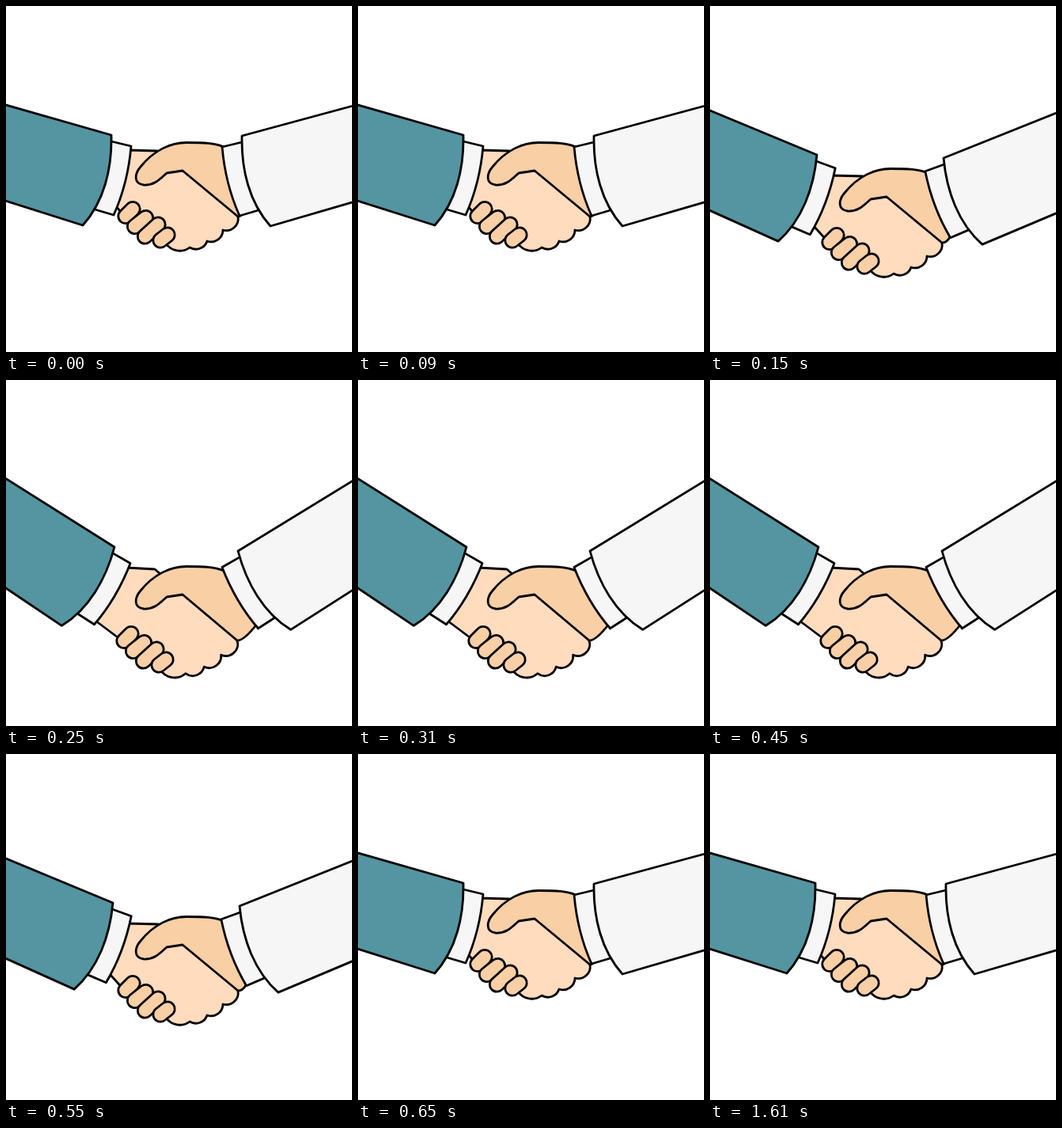
Animation of 437 by 437 pixels, one loop 2250 ms. Source, as an HTML page with a canvas:

```html
<!DOCTYPE html>
<html lang="en">
<head>
<meta charset="utf-8">
<title>Handshake</title>
<style>
html, body { margin: 0; height: 100%; overflow: hidden; background: #fff; }
canvas { display: block; }
</style>
</head>
<body>
<canvas id="stage" width="437" height="437"></canvas>
<script>
const ctx = document.getElementById('stage').getContext('2d');
const TEAL = '#5495a1', WHITE = '#f6f6f6', LIGHT = '#ffdcbd', TAN = '#f9cfa5';
const LINE = 2.8, LOOP = 2250;

// Arm shapes, measured from the upper corner of the sleeve
const CUFF = 'M-2 7.5L25 14Q21 61 3 101L-24 93Z';
const sleeve = (top, bottom) => `M-266 ${top}L0 0C1 42 -9 84 -36 114L-266 ${bottom}Z`;
const LEFT_SLEEVE = sleeve(-76, 41), RIGHT_SLEEVE = sleeve(-72, 47);

const GRIP = 'M223 208L203 211C196 217 188 227 174 226C160 224 163 211 170 203' +
  'C187 182 208 172.5 228 172.5C250 172.5 264 173 275 178';
const LOW_GRIP = 'M227 298L201 301C190 306 179 319 163 319C147 317 150 305 162 295' +
  'C180 276 210 262 238 262C262 262 275 268 287 272L295 272';

const FINGERS = [
  [151, 265.5, 160, 256.5], [162.5, 278.5, 176.5, 267.5], [175.5, 291, 192, 276], [195, 296, 204, 289],
];
// Radius and step of each knuckle arc, from the heel of the hand leftwards
const KNUCKLES = [[15, -19, 17], [15, -20, 14], [15, -22, 8], [21, -30, -5]];

// left, right: sleeve corner and turn in degrees; heel: cuff point and control of the curve to the corner
const POSES = [
  { left: [133, 163, 0], right: [298, 164, 0], drop: 0, fingers: [0, 0], spread: 1,
    top: '155 182L190 183', low: '138 252', corner: [293, 266], heel: [296, 265, 295, 266] },
  { left: [135, 188, 6.6], right: [295, 192, 6.6], drop: 33, fingers: [0, 33], spread: 1,
    top: '153 214L193 215', low: '131 278', corner: [293, 299], heel: [303, 292, 299, 299] },
  { left: [137, 211, 16.3], right: [293, 216, 16.3], drop: 63, fingers: [-2, 64], spread: 1.07,
    top: '152 237L188 239L195 245', low: '113 304', corner: [292, 329], heel: [317, 308, 301, 329] },
  { left: [144, 235, 26.2], right: [303, 238, 28.7], drop: 0, fingers: [2.5, 97], spread: 1.07,
    top: '153 266L194 268L200 272', low: '104 320', corner: [297, 358], heel: [339, 317, 314, 358], thumb: LOW_GRIP },
];

function shape(path, fill) {
  ctx.fillStyle = fill;
  ctx.fill(path);
  ctx.lineWidth = LINE;
  ctx.strokeStyle = '#000';
  ctx.stroke(path);
}

function moved(x, y, draw) {
  ctx.save();
  ctx.translate(x, y);
  draw();
  ctx.restore();
}

function arm([x, y, turn], side, sleevePath, color) {
  moved(x, y, () => {
    ctx.scale(side, 1);
    ctx.rotate(turn * Math.PI / 180);
    shape(new Path2D(CUFF), WHITE);
    shape(new Path2D(sleevePath), color);
  });
}

function palm({ top, low, corner: [x, y], spread, fingers: [fx, fy] }) {
  const bumps = KNUCKLES.map(([r, dx, dy]) => `a${r} ${r} 0 0 1 ${dx * spread} ${dy * spread}`).join('');
  shape(new Path2D(`M${top}L${x - 63} ${y - 76}L${x} ${y}${bumps}` +
    `L${195 + fx} ${296 + fy}L${151 + fx} ${267 + fy}L${low}Z`), LIGHT);
}

function finger([x1, y1, x2, y2]) {
  for (const [width, color] of [[21.2, '#000'], [15.6, TAN]]) {
    ctx.beginPath();
    ctx.moveTo(x1, y1);
    ctx.lineTo(x2, y2);
    ctx.lineWidth = width;
    ctx.strokeStyle = color;
    ctx.stroke();
  }
}

function grip({ drop, heel: [x, y, cx, cy], corner, thumb = GRIP }) {
  // Shift the thumb, then close it through the heel of the hand
  const outline = new Path2D();
  outline.addPath(new Path2D(thumb), new DOMMatrix([1, 0, 0, 1, 0, drop]));
  outline.lineTo(x, y);
  outline.quadraticCurveTo(cx, cy, ...corner);
  outline.closePath();
  shape(outline, TAN);
}

function draw(pose) {
  ctx.fillStyle = '#fff';
  ctx.fillRect(0, 0, 437, 437);
  ctx.lineJoin = ctx.lineCap = 'round';
  palm(pose);
  moved(...pose.fingers, () => FINGERS.forEach(finger));
  grip(pose);
  arm(pose.left, 1, LEFT_SLEEVE, TEAL);
  arm(pose.right, -1, RIGHT_SLEEVE, WHITE);
}

function tick() {
  // Poses run 0 1 2 3 2 1 0 in steps of 100 ms, then rest
  const step = Math.floor((performance.now() % LOOP - 50) / 100);
  draw(POSES[Math.max(0, 3 - Math.abs(3 - step))]);
  requestAnimationFrame(tick);
}
tick();
</script>
</body>
</html>
```
